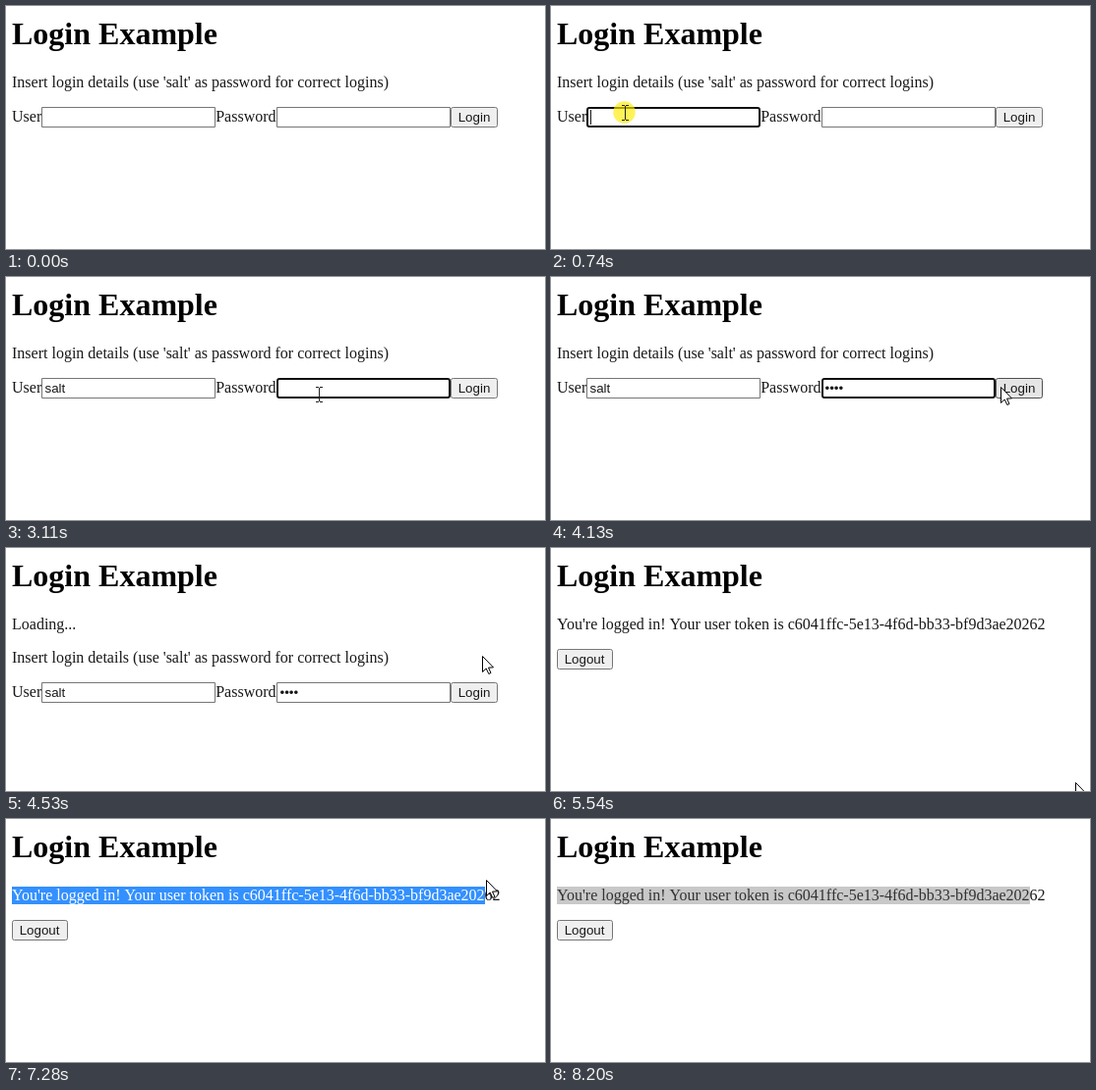
An HTML page with a canvas for the animation above (8330 ms loop, 548 px wide and 248 px high).

```html
<!DOCTYPE html>
<html lang="en">
<head>
<meta charset="utf-8">
<title>Login Example</title>
<style>
  html, body { margin: 0; width: 100%; height: 100%; overflow: hidden; background: #fff; }
  canvas { display: block; }
</style>
</head>
<body>
<canvas id="stage" width="548" height="248"></canvas>
<script>
const canvas = document.getElementById('stage');
const ctx = canvas.getContext('2d');
const LOOP = 8330;
const STEP = LOOP / 125;

const SERIF = '"Liberation Serif", "Times New Roman", serif';
const BODY = '16px ' + SERIF;
const SANS = '13.333px "Liberation Sans", Arial, sans-serif';
const INK = '#181818';
const HINT = "Insert login details (use 'salt' as password for correct logins)";
const WELCOME = "You're logged in! Your user token is c6041ffc-5e13-4f6d-bb33-bf9d3ae20262";

const LEFT = 6, BASELINE = 83, ROW = 103, ROW_GAP = 34;
const FIELD_W = 177, BOX_H = 21;
const USER_X = 36, PASSWORD_X = 275;
const LOGIN_X = PASSWORD_X + FIELD_W, LOGIN_W = 48;

const PRESS = 130;
const USER_CLICK = 735, PASSWORD_CLICK = 1945, LOGIN_CLICK = 4325;
const LOADING_AT = LOGIN_CLICK + PRESS;
const LOGGED_IN_AT = 5535, INACTIVE_AT = 8190;
const DRAG_START = 6660, DRAG_END = 7242, SELECT_LAG = 38;
const POINTER_IN = 58, POINTER_OUT = 7460;

// The pointer rests between these moves.
const ENTRY = { x: 358, y: 210 };
const MOVES = [
  { start: POINTER_IN, end: 600, x: 75, y: 109 },
  { start: 1330, end: 1595, x: 234, y: 118 },
  { start: 1660, end: 1930, x: 318, y: 120 },
  { start: 3790, end: 4250, x: 484, y: 110 },
  { start: 4610, end: 5010, x: 533, y: 239 },
  { start: 5740, end: 6600, x: 9, y: 79 },
  { start: DRAG_START, end: DRAG_END, x: 486, y: 60 },
  { start: DRAG_END, end: 7430, x: 540, y: 124 }
];

const within = (t, start, end) => t >= start && t < end;
const ease = k => k * k * (3 - 2 * k);

function positionAt(t) {
  let { x, y } = ENTRY;
  for (const move of MOVES) {
    const k = ease(Math.min(1, Math.max(0, (t - move.start) / (move.end - move.start))));
    x += (move.x - x) * k;
    y += (move.y - y) * k;
  }
  return { x: Math.round(x), y: Math.round(y) };
}

function text(str, x, y, font = BODY, color = INK) {
  ctx.font = font;
  ctx.fillStyle = color;
  ctx.fillText(str, x, y);
}

function box(x, y, w, fill, stroke, radius = 0, line = 1) {
  ctx.beginPath();
  ctx.roundRect(x + line / 2, y + line / 2, w - line, BOX_H - line, radius);
  ctx.fillStyle = fill;
  ctx.fill();
  ctx.strokeStyle = stroke;
  ctx.lineWidth = line;
  ctx.stroke();
}

function field(x, y, value, focused, caret) {
  if (focused) box(x, y, FIELD_W, '#fff', '#101010', 2, 2);
  else box(x, y, FIELD_W, '#fff', '#767676');
  text(value, x + 3.5, y + 15, SANS);
  if (caret) ctx.fillRect(Math.round(x + 3.5 + ctx.measureText(value).width), y + 3, 1, 15);
}

function button(x, y, w, label, hover) {
  box(x, y, w, hover ? '#e5e5e5' : '#efefef', hover ? '#4f4f4f' : '#767676', 2);
  text(label, x + 7.7, y + 15, SANS);
}

function typed(str, t, start, interval) {
  return str.slice(0, Math.max(0, Math.floor((t - start) / interval) + 1));
}

const rowTop = t => t >= LOADING_AT ? ROW + ROW_GAP : ROW;
const inBox = (p, x, y, w, h = BOX_H) => within(p.x, x, x + w) && within(p.y, y, y + h);

function drawForm(t, pointer) {
  const y = rowTop(t);
  if (t >= LOADING_AT) text('Loading...', LEFT, BASELINE);
  text(HINT, LEFT, BASELINE + y - ROW);
  text('User', LEFT, y + 15);
  text('Password', USER_X + FIELD_W + 0.2, y + 15);

  const inUser = within(t, USER_CLICK, PASSWORD_CLICK);
  const inPassword = within(t, PASSWORD_CLICK, LOGIN_CLICK);
  // One mistyped character is erased before the password goes in.
  const erased = 3105, retyped = 3245;
  const dots = within(t, 2275, erased) ? '•' : typed('••••', t, retyped, 88);
  const caretOn = within(t, PASSWORD_CLICK, 2825) || within(t, retyped, 4010);
  field(USER_X, y, typed('salt', t, 1125, 135), inUser, inUser);
  field(PASSWORD_X, y, dots, inPassword, caretOn);
  button(LOGIN_X, y, LOGIN_W, 'Login', inBox(pointer, LOGIN_X, y, LOGIN_W));
}

function selectionWidth(t) {
  const target = positionAt(Math.min(t - SELECT_LAG, DRAG_END)).x - LEFT;
  let best = 0;
  for (let i = 1; i <= WELCOME.length; i++) {
    const w = ctx.measureText(WELCOME.slice(0, i)).width;
    if (Math.abs(w - target) < Math.abs(best - target)) best = w;
  }
  return Math.round(best);
}

function drawAccount(t, time) {
  text(WELCOME, LEFT, BASELINE);
  if (time >= DRAG_START) {
    const inactive = t >= INACTIVE_AT;
    ctx.save();
    ctx.beginPath();
    ctx.rect(LEFT, BASELINE - 14, selectionWidth(time), 18);
    ctx.clip();
    ctx.fillStyle = inactive ? '#c8c8c8' : '#3390ff';
    ctx.fillRect(0, 0, canvas.width, canvas.height);
    text(WELCOME, LEFT, BASELINE, BODY, inactive ? '#323232' : '#fff');
    ctx.restore();
  }
  button(LEFT, ROW, 57, 'Logout', false);
}

function overText(t, p) {
  if (within(t, DRAG_START, DRAG_END)) return true;
  if (t >= LOGGED_IN_AT) return inBox(p, LEFT, BASELINE - 14, 496, 18);
  return [USER_X, PASSWORD_X].some(x => inBox(p, x, rowTop(t), FIELD_W));
}

function drawIBeam({ x, y }) {
  ctx.fillStyle = '#222';
  ctx.fillRect(x, y - 7, 1, 14);
  for (const edge of [y - 8, y + 7]) {
    ctx.fillRect(x - 3, edge, 3, 1);
    ctx.fillRect(x + 1, edge, 3, 1);
  }
}

function drawArrow({ x, y }) {
  ctx.save();
  ctx.translate(x + 0.5, y + 0.5);
  const outline = new Path2D('M0 0V16L3.7 12.5L6.3 18L8.5 17L6 11.6L11 11.4Z');
  ctx.fillStyle = '#fff';
  ctx.fill(outline);
  ctx.strokeStyle = '#000';
  ctx.lineWidth = 1;
  ctx.stroke(outline);
  ctx.restore();
}

function drawPointer(t, pointer) {
  if (!within(t, POINTER_IN, POINTER_OUT)) return;
  const clicking = [USER_CLICK, PASSWORD_CLICK, LOGIN_CLICK].some(at => within(t, at, at + PRESS));
  if (clicking || within(t, DRAG_START, DRAG_END)) {
    ctx.fillStyle = 'rgba(255, 235, 0, 0.65)';
    ctx.beginPath();
    ctx.arc(pointer.x - 0.5, pointer.y - 0.5, 11.2, 0, Math.PI * 2);
    ctx.fill();
  }
  (overText(t, pointer) ? drawIBeam : drawArrow)(pointer);
}

function draw(t) {
  const sampled = Math.floor((t + 12) / STEP) * STEP;
  const pointer = positionAt(sampled);
  ctx.fillStyle = '#fff';
  ctx.fillRect(0, 0, canvas.width, canvas.height);
  text('Login Example', LEFT, 39, 'bold 32px ' + SERIF, '#000');
  if (t < LOGGED_IN_AT) drawForm(t, pointer);
  else drawAccount(t, sampled);
  drawPointer(t, pointer);
}

function tick() {
  draw(performance.now() % LOOP);
  requestAnimationFrame(tick);
}
tick();
</script>
</body>
</html>
```
